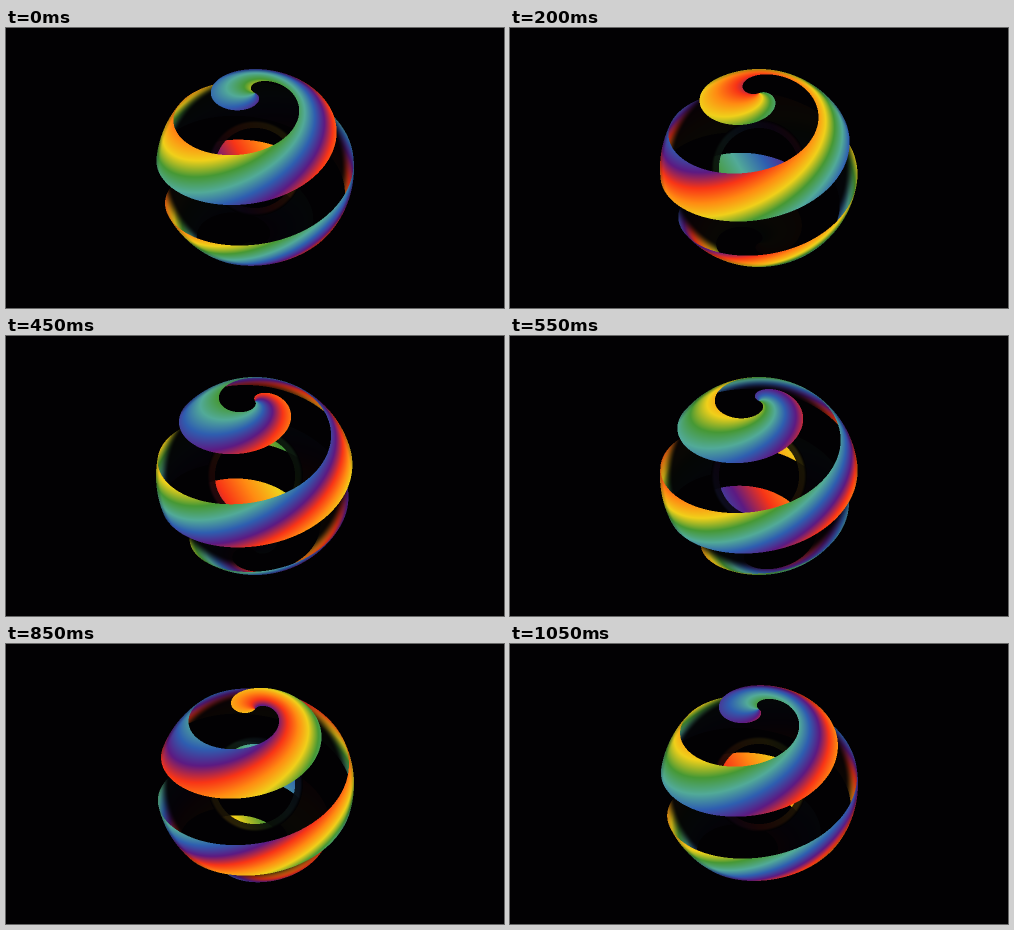
An HTML page with a canvas that plays this animation: 498 px wide and 280 px high, repeating every 1100 ms.

```html
<!DOCTYPE html>
<html lang="en">
<head>
<meta charset="utf-8">
<title>Rainbow spiral sphere</title>
<style>
  html, body { margin: 0; width: 100%; height: 100%; overflow: hidden; background: #020103; }
  canvas { display: block; }
</style>
</head>
<body>
<canvas id="stage" width="498" height="280"></canvas>
<script>
const ctx = document.getElementById('stage').getContext('2d');
const LOOP = 1100, STEP = 50;
const CX = 249, CY = 140, R = 99, BOX = 101;
const TILT_UP = 0.757, TILT_FRONT = 0.653;   // direction of the pole
const BACKDROP = [2, 1, 3];
const PALETTE = [
  [248, 52, 22], [255, 138, 18], [240, 208, 26], [70, 152, 52],
  [82, 170, 152], [46, 94, 176], [92, 26, 130]
];
const SUB = [0.25, 0.75];

const fract = v => v - Math.floor(v);
const smooth = (a, b, v) => {
  const k = Math.min(1, Math.max(0, (v - a) / (b - a)));
  return k * k * (3 - 2 * k);
};

function addRainbow(sum, phase, light) {
  const p = fract(phase) * PALETTE.length;
  const i = Math.floor(p) % PALETTE.length, k = p - Math.floor(p);
  const a = PALETTE[i], b = PALETTE[(i + 1) % PALETTE.length];
  for (let c = 0; c < 3; c++) {
    const full = a[c] + (b[c] - a[c]) * k;
    sum[c] += BACKDROP[c] + (full - BACKDROP[c]) * light;
  }
}

// Position across the spiral: 0 to 0.5 is ribbon, from outer to inner edge.
function swirl(x, y, side, t) {
  const z = side * Math.sqrt(Math.max(0, 1 - x * x - y * y));
  const pole = -y * TILT_UP + z * TILT_FRONT;
  const front = y * TILT_FRONT + z * TILT_UP;
  const polar = Math.acos(Math.max(-1, Math.min(1, pole)));
  return fract(t + 1 / 6 + Math.atan2(-x, front) / (2 * Math.PI) - polar * 3 / Math.PI);
}

const ribbonPhase = (s, x, t) => 0.36 + 0.46 * (1 - 2 * s) + 0.3 * x - 2 * t;

function addSample(sum, x, y, t) {
  const r = Math.hypot(x, y);
  if (r >= 1) return addRainbow(sum, 0, 0);

  const s = swirl(x, y, 1, t);
  if (s < 0.5) return addRainbow(sum, ribbonPhase(s, x, t), 1 - 0.25 * smooth(0.96, 1, r));

  // Through the gaps: a round opening with a dim rim, then the far ribbon near the edge.
  if (r < 0.485) {
    const open = swirl(x / 0.79, (y - 0.13) / 0.79, -1, t) >= 0.5;
    const rim = 0.16 * smooth(0.485, 0.45, r);
    const light = r < 0.405 ? (open ? 1 : 0) : (open ? rim : rim * 0.6);
    return addRainbow(sum, 1.03 + 0.5 * x - 0.3 * y - 2 * t, light);
  }
  const far = swirl(x, y, -1, t);
  const light = far < 0.5 ? 0.03 + 0.8 * smooth(0.87, 0.98, r) : 0;
  addRainbow(sum, ribbonPhase(far, x, t), light);
}

function draw(t) {
  ctx.fillStyle = `rgb(${BACKDROP})`;
  ctx.fillRect(0, 0, 498, 280);
  const size = BOX * 2, img = ctx.createImageData(size, size);
  for (let row = 0, at = 0; row < size; row++) {
    for (let col = 0; col < size; col++, at += 4) {
      const sum = [0, 0, 0];
      for (const dy of SUB) for (const dx of SUB)
        addSample(sum, (col + dx - BOX) / R, (row + dy - BOX) / R, t);
      for (let c = 0; c < 3; c++) img.data[at + c] = sum[c] / 4;
      img.data[at + 3] = 255;
    }
  }
  ctx.putImageData(img, CX - BOX, CY - BOX);
}

const start = performance.now();
let shown = -1;
function tick() {
  const step = Math.floor((performance.now() - start) % LOOP / STEP);
  if (step !== shown) draw((shown = step) * STEP / LOOP);
  requestAnimationFrame(tick);
}
tick();
</script>
</body>
</html>
```
